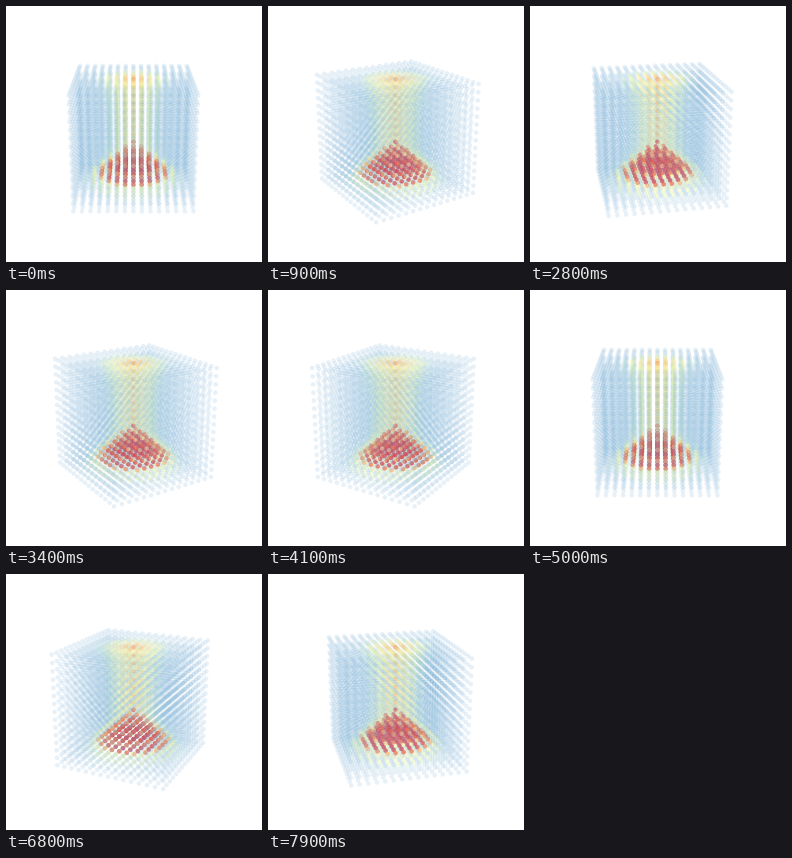
Animation of 256 by 256 pixels, one loop 8000 ms. Source, as a matplotlib script:

```python
import numpy as np
import matplotlib.pyplot as plt
from matplotlib.animation import FuncAnimation
from matplotlib.colors import LinearSegmentedColormap

SIZE, DPI = 256, 100
FRAMES, INTERVAL = 80, 100
STEP = np.radians(3.6)
ELEV = np.radians(20)
DIST, FOCAL = 10, 565
CENTER = (127.4, 128.2)
DOT = 4.6

heat_map = LinearSegmentedColormap.from_list("heat", [
    "#74add6", "#98d0cc", "#bfe3ae", "#e6f598", "#fdf7b0",
    "#fee08b", "#fdae61", "#f46d43", "#d53e4f"])


def field(x, y, z):
    """Hot cone on a disc, with a waisted plume rising to the top."""
    r = np.hypot(x, y)
    h = (z + 0.714) / 1.714
    cone = 1 / (1 + np.exp((r - 0.7 * (1 - h / 0.43)) / 0.055))
    waist = 0.43 + 0.12 * (2 * h - 1) ** 2
    core = 0.54 + 0.17 * np.exp(-(r / 0.17) ** 2)
    core = core + 0.06 * np.exp(-((h - 1) / 0.07) ** 2)
    plume = core * np.exp(-(r / waist) ** 4)
    heat = np.maximum(cone, plume)
    below = np.where(h < -0.12, 0, 0.42)
    return np.where(h < -0.01, heat * below, heat)


def project(theta):
    """Return screen positions and nearness of all points."""
    c, s = np.cos(theta), np.sin(theta)
    right, front = gx * c + gy * s, gy * c - gx * s
    near = front * np.cos(ELEV) + gz * np.sin(ELEV)
    up = gz * np.cos(ELEV) - front * np.sin(ELEV)
    scale = FOCAL / (DIST - near)
    pos = np.column_stack([CENTER[0] + right * scale,
                           CENTER[1] - up * scale])
    return pos, near


axis = np.linspace(-1, 1, 15)
gx, gy, gz = (g.ravel() for g in np.meshgrid(axis, axis, axis))
heat = field(gx, gy, gz)
colors = heat_map(heat)
colors[:, 3] = 0.16 + 0.62 * heat ** 1.4

fig = plt.figure(figsize=(SIZE / DPI, SIZE / DPI), dpi=DPI, facecolor="white")
ax = fig.add_axes([0, 0, 1, 1])
ax.set(xlim=(0, SIZE), ylim=(SIZE, 0))
ax.axis("off")
dots = ax.scatter(gx, gy, s=(DOT * 72 / DPI) ** 2, c=colors, linewidths=0)


def update(i):
    pos, near = project(i * STEP)
    order = np.argsort(near, kind="stable")
    dots.set_offsets(pos[order])
    dots.set_facecolors(colors[order])
    return [dots]


anim = FuncAnimation(fig, update, frames=FRAMES, interval=INTERVAL,
                     init_func=lambda: update(0), repeat=True, repeat_delay=0)
plt.show()
```
